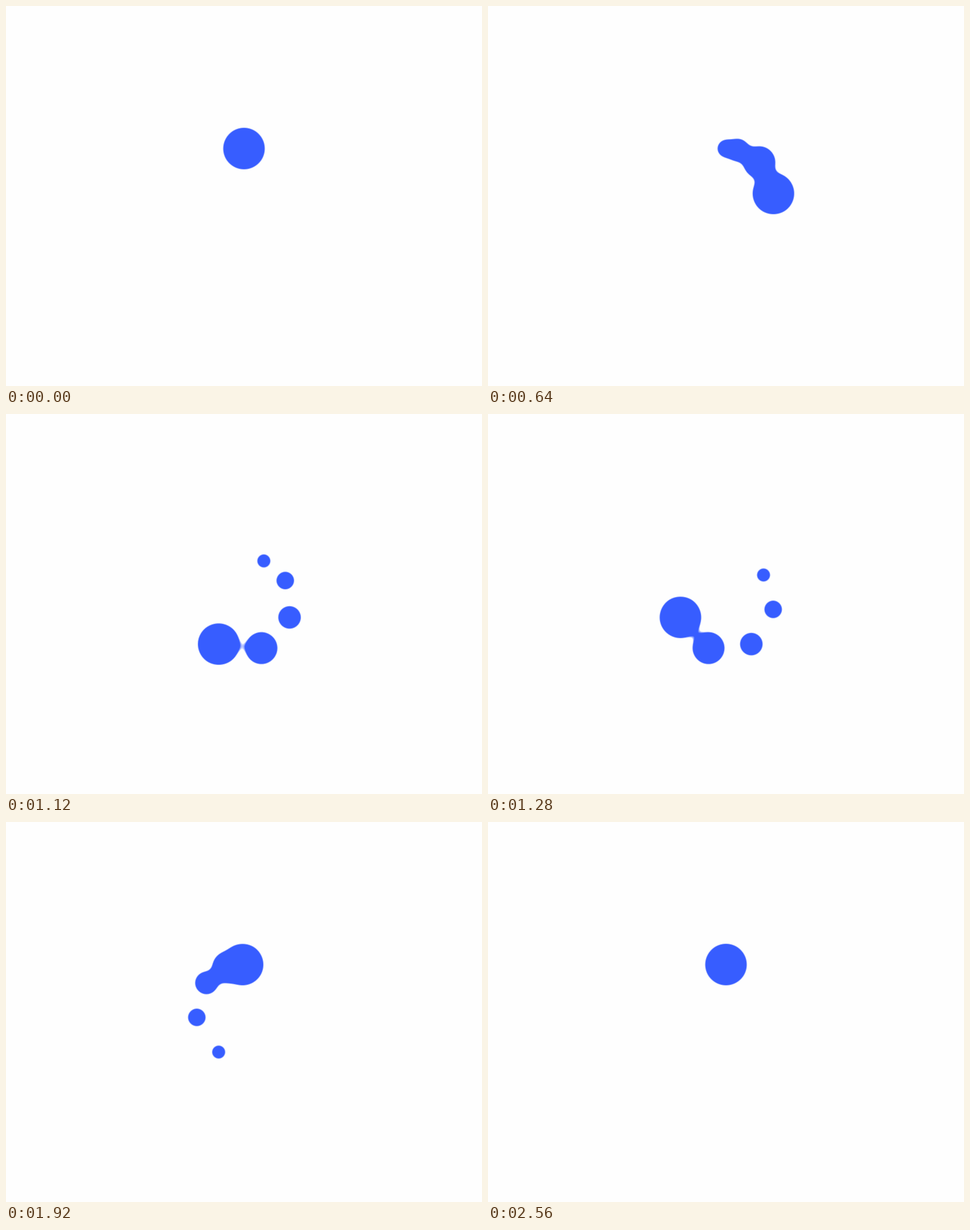
An HTML page for the animation above (2840 ms loop, 837 by 669 pixels).

```html
<!DOCTYPE html>
<html lang="en">
<head>
<meta charset="utf-8">
<title>Gooey loader</title>
<style>
  html, body { margin: 0; width: 100%; height: 100%; overflow: hidden; background: #fefefe; }
  svg { display: block; width: 100%; height: 100%; }
</style>
</head>
<body>
<svg viewBox="0 0 837 669">
  <!-- Blur, then cut the alpha near 0.6 so that close dots melt together -->
  <filter id="goo" filterUnits="userSpaceOnUse" x="0" y="0" width="837" height="669"
          color-interpolation-filters="sRGB">
    <feGaussianBlur stdDeviation="7"/>
    <feColorMatrix values="0 0 0 0 0.216  0 0 0 0 0.365  0 0 0 0 1  0 0 0 9 -4.9"/>
  </filter>
  <g id="dots" filter="url(#goo)" fill="#375dff"></g>
</svg>
<script>
  const LOOP = 2840, STEP = 40;
  const TURN = 2000, DELAY = 200;
  const CENTER = { x: 418.5, y: 334.5 }, ORBIT = 83.5;
  const RADII = [38.9, 30.6, 22.6, 18.45, 14.85];

  const group = document.getElementById('dots');
  const dots = RADII.map(radius => {
    const dot = document.createElementNS(group.namespaceURI, 'circle');
    dot.setAttribute('r', radius);
    return group.appendChild(dot);
  });

  const clamp = u => Math.min(1, Math.max(0, u));
  const smoothstep = u => u * u * (3 - 2 * u);

  function draw(time) {
    dots.forEach((dot, i) => {
      const angle = 2 * Math.PI * smoothstep(clamp((time - i * DELAY) / TURN));
      dot.setAttribute('cx', CENTER.x + ORBIT * Math.sin(angle));
      dot.setAttribute('cy', CENTER.y - ORBIT * Math.cos(angle));
    });
  }

  const start = performance.now();
  function tick() {
    const time = (performance.now() - start) % LOOP;
    draw(Math.floor(time / STEP) * STEP);
    requestAnimationFrame(tick);
  }
  tick();
</script>
</body>
</html>
```
